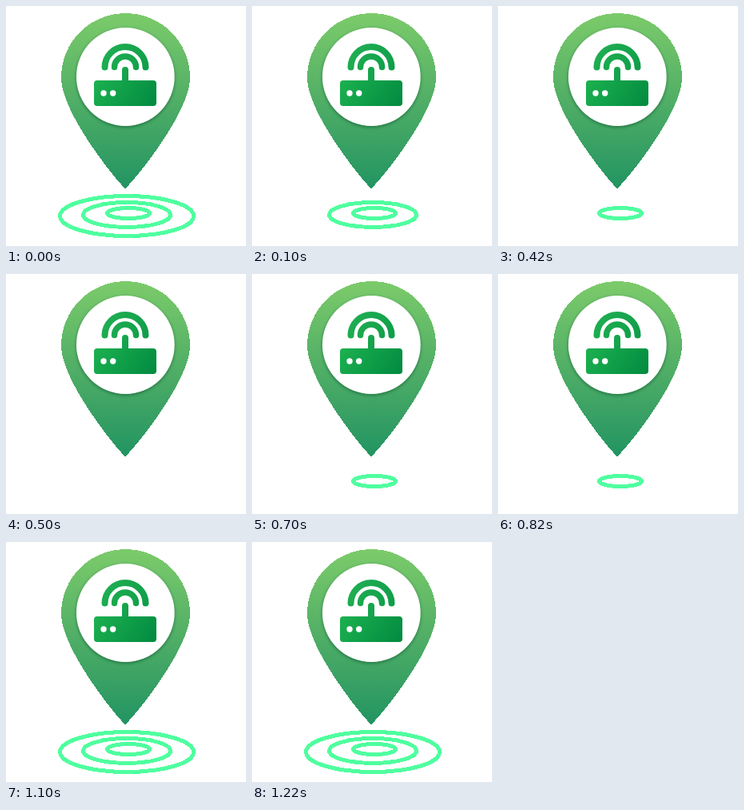
Recreate the animation shown at these times as an HTML page with a canvas. Size 300 by 300 pixels, loop 1.3 s.

```html
<!DOCTYPE html>
<html lang="en">
<head>
<meta charset="utf-8">
<title>Router location</title>
<style>
  html, body { margin: 0; width: 100%; height: 100%; overflow: hidden; background: #fff; }
  canvas { display: block; }
</style>
</head>
<body>
<canvas id="stage" width="300" height="300"></canvas>
<script>
const SIZE = 300;
const LOOP = 1300;
const TAU = Math.PI * 2;
const ctx = document.getElementById("stage").getContext("2d", { willReadFrequently: true });

// Each ring is hidden between its two times; inner ring first.
const rings = [
  { x: 153, y: 259, rx: 26.5, ry: 6.5, off: 500, on: 700 },
  { x: 151, y: 261, rx: 54.5, ry: 15.5, off: 300, on: 900 },
  { x: 151, y: 262.5, rx: 83.5, ry: 25, off: 100, on: 1100 }
];

function gradient(x0, y0, x1, y1, ...colors) {
  const result = ctx.createLinearGradient(x0, y0, x1, y1);
  colors.forEach((color, i) => result.addColorStop(i / (colors.length - 1), color));
  return result;
}

function disc(x, y, r, fill) {
  ctx.fillStyle = fill;
  ctx.beginPath();
  ctx.arc(x, y, r, 0, TAU);
  ctx.fill();
}

function drawPin() {
  ctx.fillStyle = gradient(0, 9, 0, 228, "#7ccb6a", "#50ae66", "#229462");
  ctx.beginPath();
  ctx.arc(149.5, 89.5, 80.5, Math.PI, 0);
  ctx.bezierCurveTo(230, 134, 158, 221, 149, 228);
  ctx.bezierCurveTo(140, 221, 69, 134, 69, 89.5);
  ctx.fill();
}

function drawRing({ x, y, rx, ry }) {
  ctx.strokeStyle = "#4fff9f";
  ctx.lineWidth = 5;
  ctx.beginPath();
  ctx.ellipse(x, y, rx, ry, 0, 0, TAU);
  ctx.stroke();
}

// Turns soft edges into hard, aliased ones.
function hardenEdges() {
  const image = ctx.getImageData(0, 0, SIZE, SIZE);
  for (let i = 3; i < image.data.length; i += 4) {
    image.data[i] = image.data[i] < 128 ? 0 : 255;
  }
  ctx.putImageData(image, 0, 0);
}

function drawBadge() {
  ctx.save();
  ctx.shadowColor = "rgba(0, 60, 30, 0.5)";
  ctx.shadowBlur = 4;
  ctx.shadowOffsetY = 1.5;
  disc(149.3, 88.5, 61.4, "#fff");
  ctx.restore();
}

function drawRouter() {
  const signal = (r, width) => {
    ctx.lineWidth = width;
    ctx.beginPath();
    ctx.arc(149, 76.5, r, Math.PI, 0);
    ctx.stroke();
  };
  ctx.lineCap = "round";
  ctx.strokeStyle = gradient(120, 47, 178, 80, "#22b053", "#0f9d49");
  signal(25.5, 8);
  signal(13.5, 7.5);

  ctx.lineWidth = 8;
  ctx.beginPath();
  ctx.moveTo(149, 80);
  ctx.lineTo(149, 95);
  ctx.stroke();

  ctx.fillStyle = gradient(115, 86, 183, 132, "#1cb150", "#028a40");
  ctx.beginPath();
  ctx.roundRect(110, 93, 78, 32, 4);
  ctx.fill();
  disc(122, 109, 3.7, "#fff");
  disc(133.7, 109, 3.7, "#fff");
}

function render() {
  const time = performance.now() % LOOP;
  ctx.clearRect(0, 0, SIZE, SIZE);
  drawPin();
  rings.filter(({ off, on }) => time < off || time >= on).forEach(drawRing);
  hardenEdges();
  drawBadge();
  drawRouter();
  requestAnimationFrame(render);
}

render();
</script>
</body>
</html>
```
